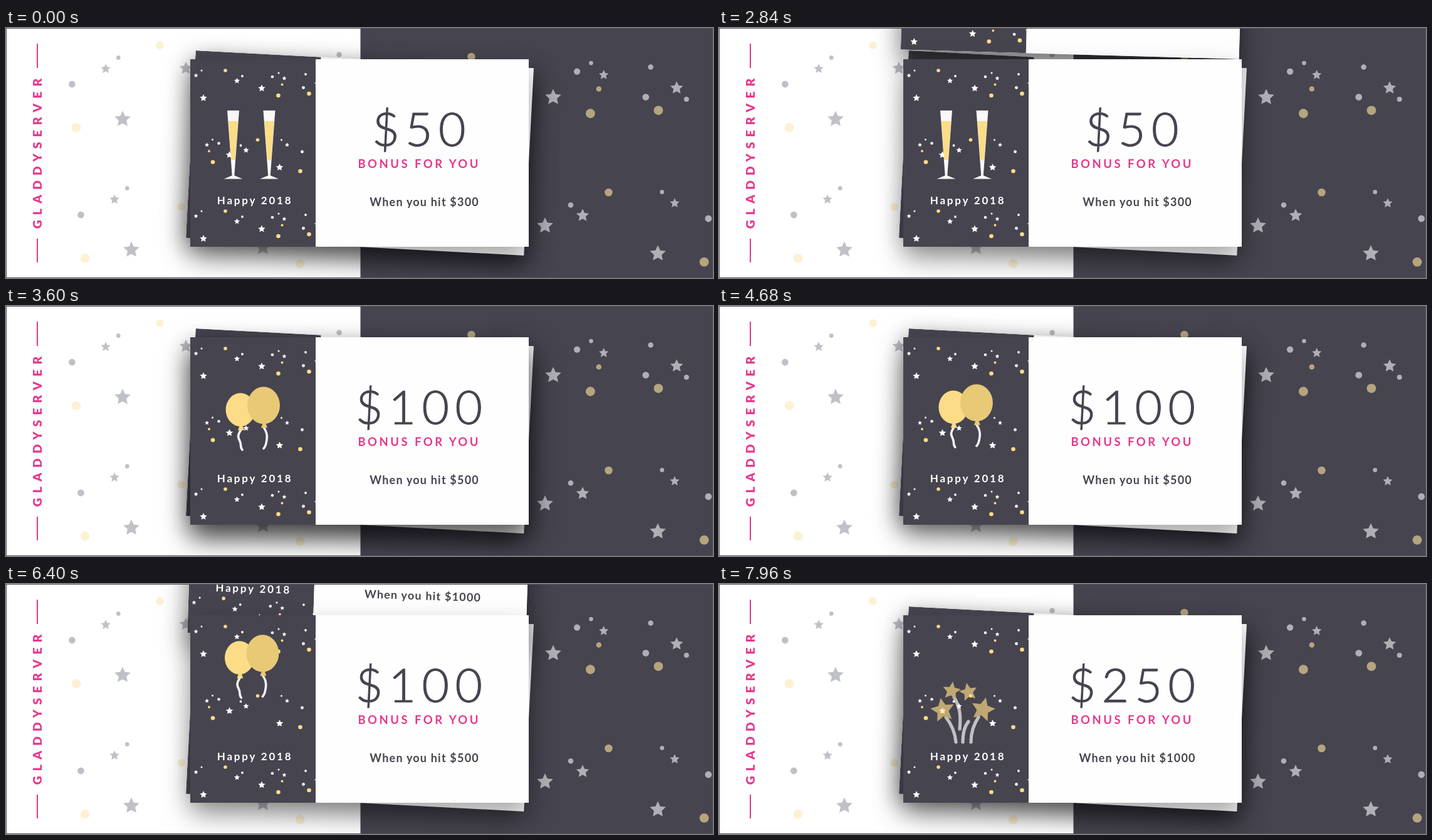
Animation, 1128 px wide and 400 px high, one loop 8000 ms. Source, as an HTML page:

```html
<!DOCTYPE html>
<html lang="en">
<head>
<meta charset="utf-8">
<title>Bonus cards</title>
<style>
  html, body { margin: 0; width: 100%; height: 100%; overflow: hidden; background: #fff; }
  #stage { position: relative; width: 1128px; height: 400px; overflow: hidden; }
  svg { position: absolute; left: 0; top: 0; display: block; font-family: Lato, "Open Sans", sans-serif; }
  text { text-anchor: middle; font-weight: 700; }
  .card { position: absolute; left: 294px; top: 50px; width: 540px; height: 300px; background: #fefefe; }
  .backing { transform: translateX(.5px) rotate(3deg); }
  .frame { position: absolute; inset: 0; z-index: 9; border: 1px solid #55535d; }
  .onWhite { --plain: #bfc1c7; --gold: #fdf1d4; }
  .onDark { --plain: #b0afb6; --gold: #b5a57f; }
  .onCard { --plain: #fff; --gold: #fddc87; }
  .plain { fill: var(--plain); }
  .gold { fill: var(--gold); }
</style>
</head>
<body>
<div id="stage"></div>
<script>
const DARK = '#46444f', PINK = '#e7388b', GOLD = '#fddc87';
const LOOP = 8000;
const stage = document.getElementById('stage');

// ---- shapes ----
function star(x, y, r, look = 'class="plain"', turn = 0) {
  const points = Array.from({ length: 10 }, (_, i) => {
    const a = (i * 36 - 90 + turn) * Math.PI / 180, d = i % 2 ? r * 0.48 : r;
    return `${(x + d * Math.cos(a)).toFixed(2)},${(y + d * Math.sin(a)).toFixed(2)}`;
  });
  return `<polygon points="${points.join(' ')}" ${look}/>`;
}
const dot = (x, y, r, name = 'plain') => `<circle cx="${x}" cy="${y}" r="${r}" class="${name}"/>`;
const gold = (x, y, r) => dot(x, y, r, 'gold');

// Half the letter spacing is added because it trails the last glyph.
const label = (x, y, size, spacing, fill, words, extra = '') =>
  `<text x="${x + spacing / 2}" y="${y}" font-size="${size}" letter-spacing="${spacing}"
    fill="${fill}" style="${extra}">${words}</text>`;

// ---- confetti: four clusters, reused at two scales and mirrored ----
const corner = star(0, 0, 6) + star(-12, -36, 3.6) + dot(-3, -44, 1.5) + dot(-36, -25, 2.4) + gold(-33, 6, 3.3);
const trio = star(0, 0, 4.8) + gold(-18.5, -16.5, 2.8) + dot(8.5, -7.5, 1.9);
const burst = star(0, 0, 6) + star(36, -16, 3.6) + dot(17, -18.5, 2.3) + dot(27, -24.5, 1.5)
  + gold(32.5, -6, 1.9) + gold(26.5, 11.5, 3.3);
const ring = star(0, 0, 4.8) + dot(-18.5, -15, 1.9) + dot(-22, 6.5, 2.4) + gold(-13, 16, 3.3) + dot(7, 8, 1.8);

const place = (cluster, x, y, scale = 1, mirror = 1) =>
  `<g transform="translate(${x} ${y}) scale(${scale * mirror} ${scale})">${cluster}</g>`;
const large = (cluster, x, y, mirror) => place(cluster, x, y, 2.24, mirror);

const backdrop = `<svg width="1128" height="400">
  <rect width="1128" height="400" fill="#fff"/>
  <rect x="565.5" width="563" height="400" fill="${DARK}"/>
  <g class="onWhite">
    ${large(corner, 186, 146)}${large(trio, 287, 64.5)}${large(ring, 573, 76)}
    ${large(corner, 200, 355)}${large(trio, 321, 323)}${large(burst, 410, 351)}
  </g>
  <g class="onDark">
    ${large(trio, 701, 83, -1)}${large(burst, 873, 111)}${large(ring, 1070, 96)}
    ${large(burst, 860, 316.5, -1)}${large(trio, 920, 300, -1)}${large(corner, 1040, 361, -1)}
  </g>
  <path d="M50 25V64M50 337V375" stroke="${PINK}" stroke-width="2"/>
  <g transform="translate(57 201) rotate(-90)">
    ${label(0, 0, 19.5, 8.1, PINK, 'GLADDYSERVER', 'font-weight:900')}
  </g>
</svg>`;

const band = place(corner, 315, 112) + place(trio, 368.5, 84.5) + place(burst, 408, 96.5) + place(ring, 496.5, 89);
const middle = place(corner, 436.5, 223, 1, -1) + place(trio, 383, 195.5, 1, -1) + place(burst, 356.5, 203, 1, -1);

// ---- icons ----
const glass = id => `<g id="${id}">
  <path fill="#f8f8f8" d="M-9.5 -55H9.5L1.8 49L15 54.5H-15L-1.8 49Z"/>
  <path fill="${GOLD}" d="M-7.7 -38H7.7L3.2 24H-3.2Z"/></g>`;

const balloon = (x, y, r, fill) => `<g fill="${fill}">
  <ellipse cx="${x}" cy="${y}" rx="${r}" ry="${r * 1.14}"/>
  <path d="M${x - 1} ${y + r * 1.14 - 2}h4l3 8h-10z"/></g>`;

const balloons = `<g id="balloons">
  <path d="M375 198C369 207 370 210 373 216S373 226 377 230M411 194C417 202 417 208 416 214S415 224 411 228"
    fill="none" stroke="#f4f4f6" stroke-width="3.6" stroke-linecap="round"/>
  ${balloon(374, 166, 23.4, GOLD)}${balloon(411, 159, 26, '#e8c976')}</g>`;

const goldStar = (x, y, r, turn) => star(x, y, r, `fill="${GOLD}"`, turn);
const firework = `<g id="firework">
  <path d="M362 213Q376 231 378 253M375 181C385 198 386 212 384 232M398 220Q389 231 389 253M414 213Q402 231 402 253"
    fill="none" stroke="#fff" stroke-width="5.2" stroke-linecap="round"/>
  ${goldStar(371, 171, 15, 8)}${goldStar(398, 173, 15, -12)}
  ${goldStar(357, 202, 20, -10)}${goldStar(421, 201, 20, 14)}</g>`;

// ---- cards, drawn in stage coordinates ----
function addCard(className, inner = '') {
  const card = document.createElement('div');
  card.className = 'card ' + className;
  card.innerHTML = `<svg width="540" height="300" viewBox="294 50 540 300">
    <rect x="294" y="50" width="200" height="300" fill="${DARK}"/>${inner}</svg>`;
  stage.append(card);
  return card;
}

const addBonus = (amount, goal, icon) => addCard('bonus', `
  <g class="onCard">${band}<g transform="translate(0 225)">${band}</g>${middle}</g>
  <rect x="494" y="50" width="340" height="300" fill="#fefefe"/>
  ${icon}
  ${label(395.7, 282, 17, 2.8, '#fff', 'Happy 2018')}
  ${label(658.8, 189, 75, 9.4, DARK, amount, `font-weight:300;stroke:${DARK};stroke-width:1.1px`)}
  ${label(657.5, 224, 18.5, 3.45, PINK, 'BONUS FOR YOU')}
  ${label(667, 285, 18, 1.2, DARK, 'When you hit ' + goal)}`);

stage.innerHTML = backdrop + '<div class="frame"></div>';
const backing = addCard('backing');
const cards = [
  { el: addBonus('$50', '$300', glass('leftGlass') + glass('rightGlass')), start: -LOOP },
  { el: addBonus('$100', '$500', balloons), start: 2440 },
  { el: addBonus('$250', '$1000', firework), start: 6064 }
];

// ---- motion ----
const ramp = (t, from, to) => Math.min(1, Math.max(0, (t - from) / (to - from)));
const quad = p => p < 0.5 ? 2 * p * p : 1 - 2 * (1 - p) ** 2;
const sine = p => (1 - Math.cos(Math.PI * p)) / 2;
const byId = id => document.getElementById(id);
const LEG = 500, LIFT = 334;

const takeOff = t => ramp(t, 0, 300);
const settle = t => ramp(t, 1100, 1600);

// A card slides up from behind the pile, then comes down on top of it.
function poseCard({ el, start }, index, time) {
  const t = time - start;
  const rising = t < LEG;
  const up = quad(ramp(t, 0, LEG));
  const left = 1 - quad(ramp(t, LEG, 2 * LEG));
  const y = -LIFT * (rising ? up : left);
  const turn = rising ? 3 - 1.5 * up : 1.5 * left ** 0.45;
  const next = cards[index + 1];
  const covered = next ? settle(time - next.start) : 0;
  const shade = (0.55 * takeOff(t) - 0.2 * settle(t)) * (1 - covered);
  el.style.visibility = t < 0 ? 'hidden' : 'visible';
  el.style.zIndex = 2 * index + (rising ? -1 : 2);
  el.style.transform = `translateY(${y}px) rotate(${turn}deg)`;
  el.style.boxShadow = `0 20px 40px rgba(0,0,0,${shade})`;
}

function render(time) {
  cards.forEach((card, i) => poseCard(card, i, time));

  // The pile throws a smaller shadow while one of its cards is away.
  const away = cards.reduce((sum, { start }) => sum + takeOff(time - start) - settle(time - start), 0);
  backing.style.boxShadow =
    `0 ${14 + 6 * away}px 38px ${-10 * away}px rgba(0,0,0,${0.58 - 0.28 * away})`;

  const tilt = 9.4 * (sine(ramp(time, 400, 800)) - sine(ramp(time, 1200, 1640)));
  byId('leftGlass').setAttribute('transform', `translate(362.5 187) rotate(${tilt})`);
  byId('rightGlass').setAttribute('transform', `translate(420 187) rotate(${-tilt})`);

  const float = sine(ramp(time, 4400, 5900));
  byId('balloons').setAttribute('transform', `translate(${-1.6 * float} ${-48 * float})`);

  const grow = ramp(time, 6880, 7960);
  const size = 0.2 + 0.8 * (1 - (1 - grow) ** 2);
  byId('firework').setAttribute('transform', `translate(388 248) scale(${size}) translate(-388 -248)`);
  byId('firework').setAttribute('opacity', grow ? 0.08 + 0.58 * grow : 0);
}

const origin = performance.now();
function tick() {
  render((performance.now() - origin) % LOOP);
  requestAnimationFrame(tick);
}
tick();
</script>
</body>
</html>
```
